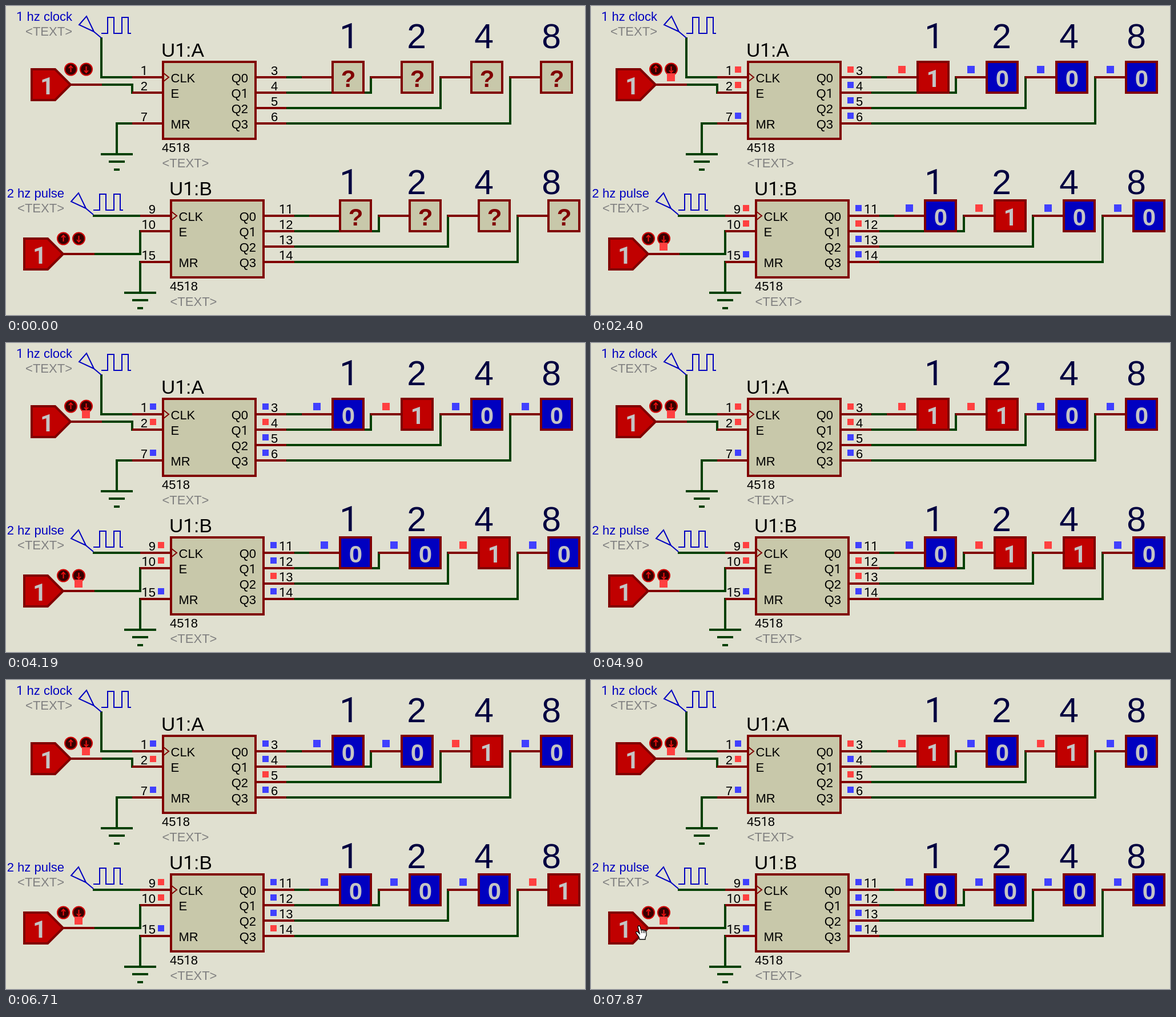
Animation of 1014x542 px, one loop 8 s. Source, as an HTML page with a canvas:

```html
<!DOCTYPE html>
<html lang="en">
<head>
<meta charset="utf-8">
<title>Dual BCD counter</title>
<style>
html, body { margin: 0; width: 1014px; height: 542px; overflow: hidden; background: #e0e0d0; }
canvas { display: block; }
</style>
</head>
<body>
<canvas id="stage" width="1014" height="542"></canvas>
<script>
const ctx = document.getElementById('stage').getContext('2d');
const LOOP = 8000, START = 1380;
const BG = '#e0e0d0', BODY = '#c8c8aa', PIN = '#800000', WIRE = '#004000', INK = '#0000c0',
      HIGH = '#c00000', LOW = '#0000c0', HOT = '#ff4040', COLD = '#4040ff', DIGIT = '#c4c4c4';

// Rising clock edges and the moments the outputs follow
const riseA = [2000, 3250, 4510, 5770, 7250];
const fallA = [2630, 3890, 5130, 6390, 7870];
const outA = [2080, 3340, 4600, 5840, 7330];
const riseB = [1700, 2310, 2950, 3570, 4190, 4830, 5450, 6070, 6710, 7560];
const fallB = [...riseA, ...fallA];
const outB = [1700, 2400, 3020, 3660, 4280, 4900, 5540, 6160, 6800, 7640];

const passed = (times, t) => times.filter(v => v <= t).length;

function path(points, color, width = 4, fill = null, closed = false) {
  ctx.beginPath();
  points.forEach(([x, y], i) => i ? ctx.lineTo(x, y) : ctx.moveTo(x, y));
  if (closed) ctx.closePath();
  if (fill) { ctx.fillStyle = fill; ctx.fill(); }
  ctx.strokeStyle = color;
  ctx.lineWidth = width;
  ctx.stroke();
}

// The digit 1 has no foot, so it is set in Roboto
function text(str, x, y, { size = 22, color = '#000', align = 'left', bold = false } = {}) {
  const setFont = run => {
    const family = run === '1' ? 'Roboto' : '"Liberation Sans", Arial';
    ctx.font = `${bold ? 'bold ' : ''}${size}px ${family}, sans-serif`;
  };
  const runs = String(str).split(/(1)/).filter(Boolean);
  const widths = runs.map(run => (setFont(run), ctx.measureText(run).width));
  const total = widths.reduce((a, b) => a + b, 0);
  x -= total * { left: 0, center: 0.5, right: 1 }[align];
  ctx.fillStyle = color;
  runs.forEach((run, i) => {
    setFont(run);
    ctx.fillText(run, x, y);
    x += widths[i];
  });
}

function box(x, y, w, h, fill) {
  ctx.fillStyle = fill;
  ctx.fillRect(x, y, w, h);
  ctx.strokeStyle = PIN;
  ctx.lineWidth = 4;
  ctx.strokeRect(x, y, w, h);
}

function mark(x, y, on, size = 11) {
  ctx.fillStyle = on ? HOT : COLD;
  ctx.fillRect(x, y, size, size);
}

function at(x, y, draw) {
  ctx.save();
  ctx.translate(x, y);
  draw();
  ctx.restore();
}

function counter(gridX, top, name, pins, value, clock, live) {
  const x = Math.round(gridX), right = x + 162;
  const row = i => top + 27 * (i + 1);
  const display = i => Math.round(gridX + 296.5 + 121.6 * i);

  for (const r of [0, 1, 3]) path([[x - 54, row(r)], [x, row(r)]], PIN);
  for (let i = 0; i < 4; i++) {
    const y = row(i), left = display(i), bend = left - 54;
    path([[right, y], [right + 54, y]], PIN);
    path(i ? [[right + 54, y], [bend, y], [bend, top + 25]] : [[right + 54, y], [bend, y]], WIRE);
    path([[bend - (i ? 1 : 0), top + 27], [left, top + 27]], PIN);
  }
  box(x, top, 162, 135, BODY);
  path([[x, top + 19], [x + 10, top + 27], [x, top + 35]], PIN, 2);
  text(name, x - 3, top - 9, { size: 33.6 });
  text('4518', x - 2, top + 158);
  text('<TEXT>', x - 1.5, top + 185, { color: '#808080' });
  ['CLK', 'E', '', 'MR'].forEach((s, i) => text(s, x + 13.5, row(i) + 9));

  [0, 1, 3].forEach((r, i) => {
    text(pins[i], x - 27, row(r) - 4, { align: 'right' });
    if (live) mark(x - 23, row(r) - 19, i === 0 ? clock : i === 1);
  });
  for (let i = 0; i < 4; i++) {
    const on = value >> i & 1, left = display(i);
    text('Q' + i, x + 149, row(i) + 9, { align: 'right' });
    text(pins[3 + i], x + 189, row(i) - 4);
    if (live) {
      mark(x + 174, row(i) - 19, on);
      mark(left - 34, top + 7, on, 13);
    }
    box(left, top, 54, 54, live ? (on ? HIGH : LOW) : BODY);
    text(live ? on : '?', left + 27.5, top + 43.5,
      { size: 42, bold: true, align: 'center', color: live ? DIGIT : PIN });
  }
}

function clockSource(label) {
  text(label, 116, 26, { color: INK, align: 'right' });
  text('<TEXT>', 116, 52, { color: '#808080', align: 'right' });
  path([[154, 45], [128, 33], [141, 18], [154, 45], [167, 56]], INK, 2);
  path([[167, 48], [178, 48], [178, 20], [189, 20], [189, 48], [203, 48],
        [203, 20], [214, 20], [214, 48], [219, 48]], INK, 2);
}

function arrowButton(x, dir) {
  ctx.beginPath();
  ctx.arc(x, 111, 10.5, 0, 7);
  ctx.fillStyle = '#380000';
  ctx.fill();
  ctx.strokeStyle = '#d00000';
  ctx.lineWidth = 2;
  ctx.stroke();
  path([[x, 111 - 5 * dir], [x, 111 + 6 * dir]], '#f01010', 2);
  path([[x - 3.5, 111 + 2 * dir], [x, 111 + 6 * dir], [x + 3.5, 111 + 2 * dir]], '#f01010', 1.8);
}

function toggle(live) {
  path([[113, 138], [168, 138]], PIN);
  path([[45, 111], [86, 111], [113, 138], [86, 165], [45, 165]], PIN, 4, HIGH, true);
  text('1', 72, 154.5, { size: 42, bold: true, align: 'center', color: DIGIT });
  arrowButton(113.5, -1);
  arrowButton(140.5, 1);
  if (live) mark(133, 118, true, 14);
}

function ground(x, y) {
  [28, 14, 5].forEach((half, i) => {
    const bar = y + Math.round(13.4 * i);
    path([[x - half, bar], [x + half, bar]], WIRE);
  });
}

function hand(x, y) {
  at(x, y, () => {
    ctx.beginPath();
    ctx.moveTo(8, 25);
    ctx.lineTo(7, 21);
    ctx.lineTo(2, 14);
    ctx.quadraticCurveTo(1, 10, 5, 12);
    ctx.lineTo(8, 15);
    ctx.lineTo(5, 3);
    ctx.quadraticCurveTo(7, -1, 9, 3);
    ctx.lineTo(11, 9);
    ctx.quadraticCurveTo(13, 7, 14, 9);
    ctx.quadraticCurveTo(17, 8, 17, 10);
    ctx.quadraticCurveTo(20, 9, 20, 13);
    ctx.lineTo(20, 18);
    ctx.lineTo(18, 22);
    ctx.lineTo(18, 25);
    ctx.closePath();
    ctx.fillStyle = '#fff';
    ctx.fill();
    ctx.strokeStyle = '#000';
    ctx.lineWidth = 1.3;
    ctx.stroke();
    path([[11, 9], [12, 14]], '#000', 1);
    path([[14, 9], [15, 14]], '#000', 1);
    path([[17, 10], [17.5, 14]], '#000', 1);
  });
}

function pointer(t) {
  if (t < 6870) return;
  const step = Math.min(1, Math.floor((t - 6870) / 75) / 4);
  const left = (1 - step) ** 2;
  hand(77 - 75 * left, 430 + 98 * left);
}

function draw(t) {
  const live = t >= START;
  ctx.fillStyle = BG;
  ctx.fillRect(0, 0, 1014, 542);

  path([[167, 55], [167, 125], [221, 125]], WIRE);
  path([[168, 138], [221, 138], [221, 154]], WIRE);
  path([[221, 206], [194, 206], [194, 260]], WIRE);
  ground(194, 260);
  path([[152, 368], [235, 368]], WIRE);
  path([[155, 435], [235, 435], [235, 393]], WIRE);
  path([[235, 447], [235, 503]], WIRE);
  ground(235, 503);

  counter(275.3, 98, 'U1:A', [1, 2, 7, 3, 4, 5, 6], passed(outA, t),
    passed(riseA, t) > passed(fallA, t), live);
  counter(288.7, 341, 'U1:B', [9, 10, 15, 11, 12, 13, 14], passed(outB, t) % 10,
    passed(riseB, t) > passed(fallB, t), live);

  for (const y of [74, 330])
    [1, 2, 4, 8].forEach((n, i) =>
      text(n, 601 + 118 * i, y, { size: 60.6, color: '#000040', align: 'center' }));

  clockSource('1 hz clock');
  at(-14, 310, () => clockSource('2 hz pulse'));
  toggle(live);
  at(-13, 297, () => toggle(live));
  pointer(t);
}

const begin = performance.now();
function tick() {
  draw((performance.now() - begin) % LOOP);
  requestAnimationFrame(tick);
}
tick();
</script>
</body>
</html>
```
